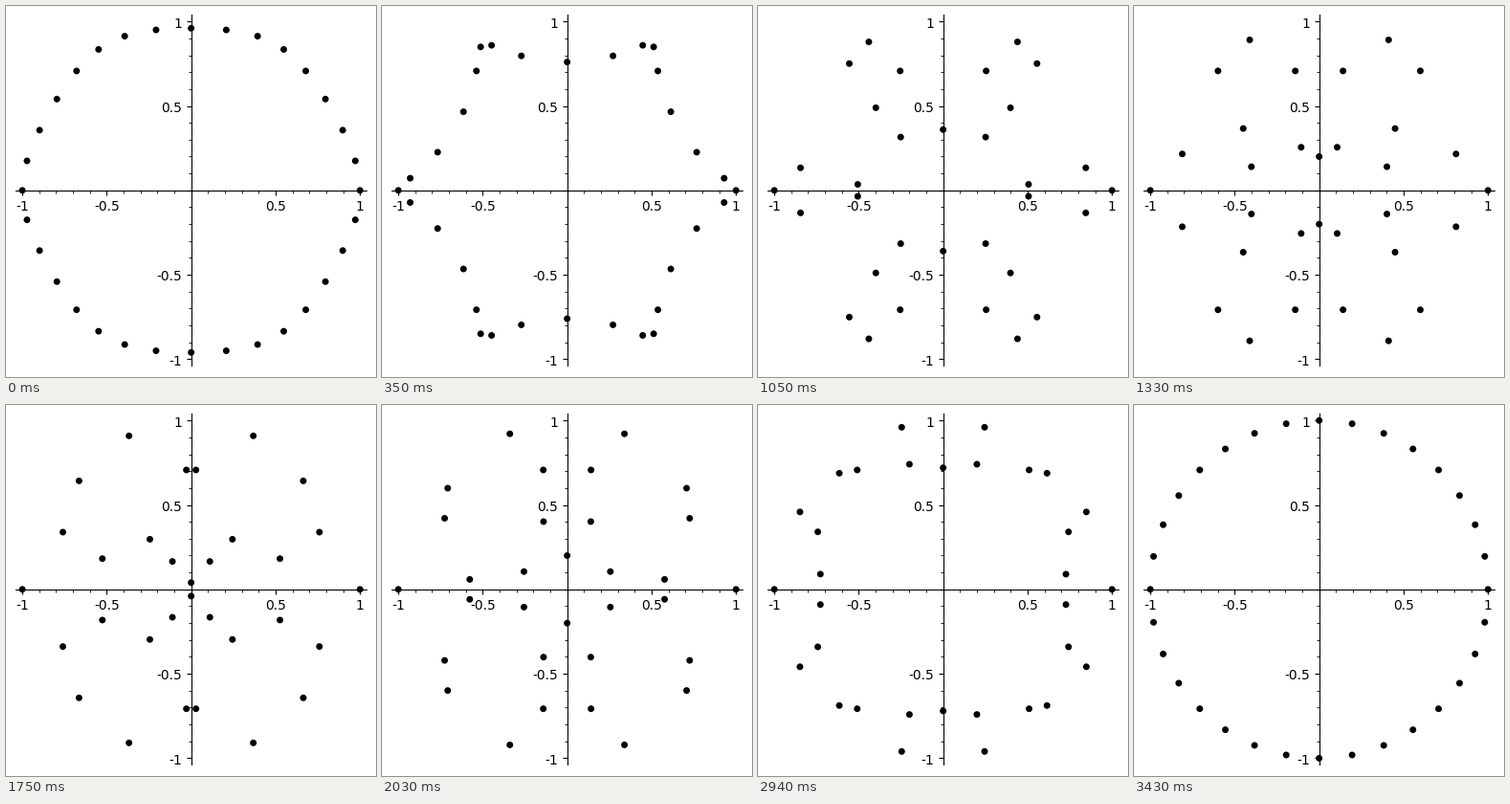
Animation of 387x388 px, one loop 3.5 s. Source, as a matplotlib script:

```python
import numpy as np
import matplotlib.pyplot as plt
from matplotlib.animation import FuncAnimation
from matplotlib.ticker import AutoMinorLocator
from matplotlib.transforms import ScaledTranslation

WIDTH, HEIGHT, DPI = 387, 388, 100
FRAMES, INTERVAL = 50, 70
UNIT = 176.6                       # pixels per data unit
CENTER_X, CENTER_Y = 193.66, 192.8  # origin, from the top left
LIMIT = 1.04
LABEL_DROP = 0.86                  # pixels

plt.rcParams["font.family"] = "DejaVu Sans"
fig = plt.figure(figsize=(WIDTH / DPI, HEIGHT / DPI), dpi=DPI, facecolor="white")

half = LIMIT * UNIT
ax = fig.add_axes([
    (CENTER_X - half) / WIDTH,
    (HEIGHT - CENTER_Y - half) / HEIGHT,
    2 * half / WIDTH,
    2 * half / HEIGHT,
])
ax.set(xlim=(-LIMIT, LIMIT), ylim=(-LIMIT, LIMIT))
for side in ("left", "bottom"):
    ax.spines[side].set_position("zero")
for side in ("right", "top"):
    ax.spines[side].set_visible(False)

drop = ScaledTranslation(0, -LABEL_DROP / DPI, fig.dpi_scale_trans)
for axis in (ax.xaxis, ax.yaxis):
    axis.set_ticks([-1, -0.5, 0, 0.5, 1], labels=["-1", "-0.5", "", "0.5", "1"])
    axis.set_minor_locator(AutoMinorLocator(5))
    for label in axis.get_ticklabels():
        label.set_transform(label.get_transform() + drop)

roots = np.exp(2j * np.pi * np.arange(32) / 32)
images = roots ** -5
dots = ax.scatter(roots.real, roots.imag, s=25, color="black",
                  edgecolors="none", zorder=5)


def update(frame):
    """Slide every root of unity straight towards its power z**-5."""
    s = (frame + 1) / FRAMES
    z = (1 - s) * roots + s * images
    dots.set_offsets(np.column_stack([z.real, z.imag]))
    return (dots,)


anim = FuncAnimation(fig, update, frames=FRAMES, interval=INTERVAL,
                     repeat=True, repeat_delay=0)
plt.show()
```
